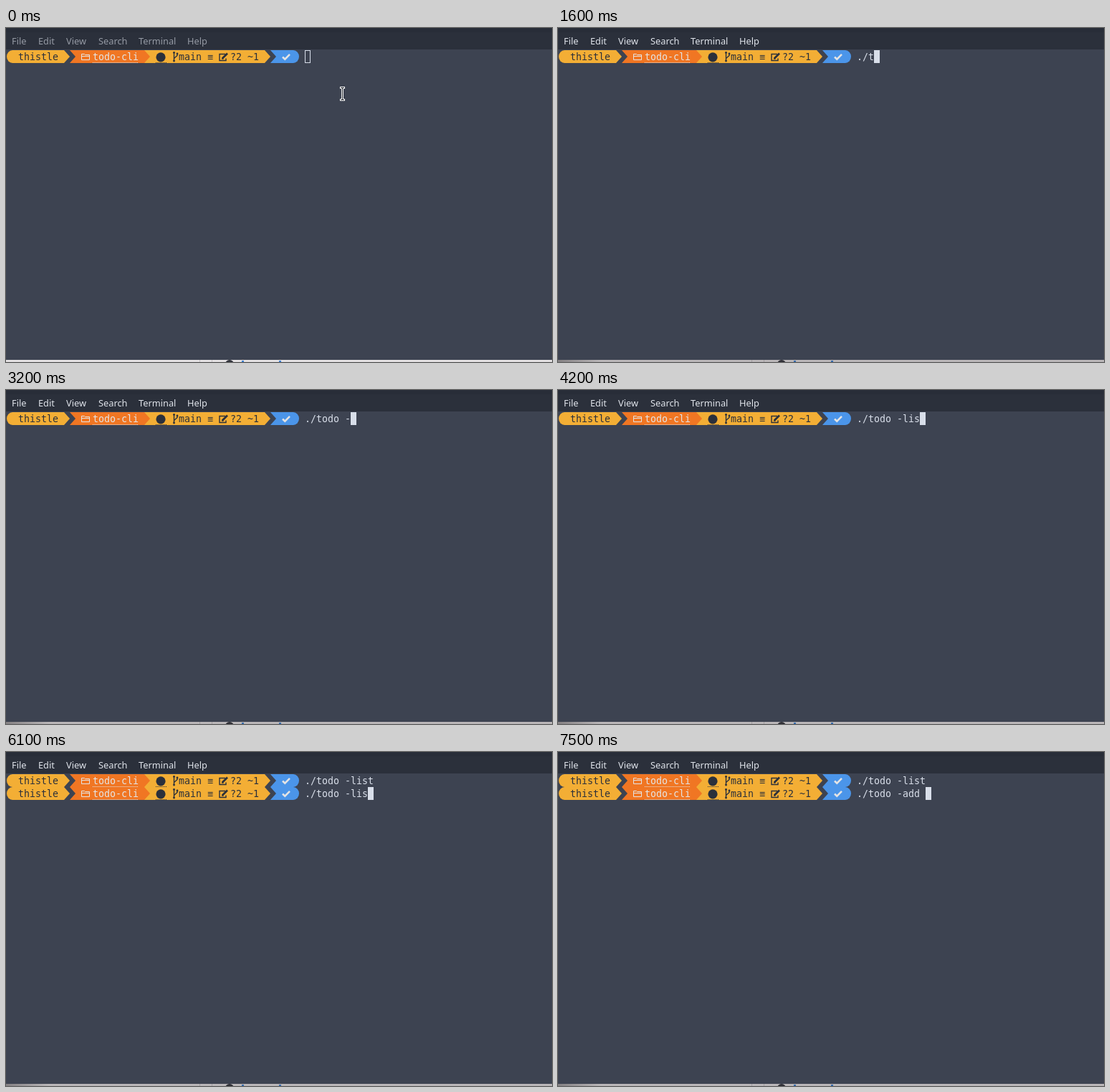
An HTML page with a canvas for the animation above (8 s loop, 762 by 467 pixels).

```html
<!DOCTYPE html>
<html lang="en">
<head>
<meta charset="utf-8">
<title>Terminal</title>
<style>
  html, body { margin: 0; width: 100%; height: 100%; overflow: hidden; background: #3d4351; }
  canvas { display: block; width: 762px; height: 467px; }
</style>
</head>
<body>
<canvas id="stage" width="762" height="467"></canvas>
<script>
const ctx = document.getElementById('stage').getContext('2d');
const W = 762, H = 467, LOOP = 8000;
const CELL = 8, ROW = 18, TOP = 31, INPUT_X = 417;
const MONO = '13.29px "DejaVu Sans Mono", "Noto Sans Mono", monospace';
const SANS = '12.8px "Noto Sans", "Open Sans", sans-serif';
const BG = '#3d4351', INK = '#2b303b', TEXT = '#d8dee9', PALE = '#e4e4e4';
const YELLOW = '#f3ae35', ORANGE = '#f07623', BLUE = '#4b95e9';

const FOCUS = 300, MENU_LIT = 500, MOUSE_MOVE = 100, MOUSE_HIDE = 1100, ENTER = 4800;
const MENU = [['File', 8], ['Edit', 45], ['View', 84], ['Search', 129], ['Terminal', 185], ['Help', 253]];

// [time, text on the input line]
const FIRST = [[0, ''], [1100, '.'], [1300, './'], [1600, './t'], [1700, './to'], [1900, './todo'],
  [2500, './todo '], [3200, './todo -'], [3700, './todo -l'], [3900, './todo -li'],
  [4200, './todo -lis'], [4300, './todo -list']];
const SECOND = [[4800, ''], [5800, './todo -list'], [6100, './todo -lis'], [6300, './todo -li'],
  [6400, './todo -l'], [6800, './todo -'], [7000, './todo -a'], [7200, './todo -ad'],
  [7400, './todo -add'], [7500, './todo -add ']];
const BLINK_OFF = [[1000, 1100], [5400, 5800]];

const typed = (keys, t) => keys.reduce((text, [at, s]) => t >= at ? s : text, '');

function rect(x, y, w, h, color) {
  ctx.fillStyle = color;
  ctx.fillRect(x, y, w, h);
}

function write(text, x, y, color, font = MONO) {
  ctx.font = font;
  ctx.fillStyle = color;
  ctx.fillText(text, x, y);
}

function trace(points, close) {
  ctx.beginPath();
  points.forEach(([x, y]) => ctx.lineTo(x, y));
  if (close) ctx.closePath();
}

function fillPoly(points, color) {
  trace(points, true);
  ctx.fillStyle = color;
  ctx.fill();
}

function line(points, color, width = 1, close = false) {
  trace(points, close);
  ctx.strokeStyle = color;
  ctx.lineWidth = width;
  ctx.stroke();
}

function dot(x, y, r, color) {
  ctx.beginPath();
  ctx.arc(x, y, r, 0, Math.PI * 2);
  ctx.fillStyle = color;
  ctx.fill();
}

function dotted(x, end, y, color) {
  for (; x < end; x += 2) rect(x, y, 1, 1, color);
}

// Segment with a pointed right end and an optional notch on the left
function arrow(x, end, notch, color) {
  const points = [[x, 0], [end, 0], [end + CELL, ROW / 2], [end, ROW], [x, ROW]];
  if (notch) points.push([x + CELL, ROW / 2]);
  fillPoly(points, color);
}

function cap(x, side, color) {
  ctx.beginPath();
  ctx.ellipse(x, ROW / 2, CELL, ROW / 2, 0, -Math.PI / 2, Math.PI / 2, side < 0);
  ctx.fillStyle = color;
  ctx.fill();
}

function folder(x, y) {
  line([[x, y], [x + 4, y], [x + 5, y + 1], [x + 11, y + 1], [x + 11, y + 8], [x, y + 8]], PALE, 1, true);
  line([[x, y + 3], [x + 11, y + 3]], PALE);
}

function branch(x, y) {
  line([[x + 1.5, y], [x + 1.5, y + 13]], INK, 1.4);
  line([[x + 6, y + 2], [x + 6, y + 5], [x + 1.5, y + 9]], INK, 1.4);
  dot(x + 1.5, y + 1, 1.4, INK);
  dot(x + 6, y + 2.5, 1.4, INK);
  dot(x + 1.5, y + 12.5, 1.4, INK);
}

function pencil(x, y) {
  line([[x + 9, y + 1], [x + 1, y + 1], [x + 1, y + 10], [x + 10, y + 10], [x + 10, y + 7]], INK, 1.4);
  line([[x + 5, y + 7], [x + 12, y]], INK, 2.6);
  fillPoly([[x + 4, y + 8.3], [x + 4.4, y + 5.4], [x + 7, y + 8]], INK);
}

function prompt(row) {
  ctx.save();
  ctx.translate(0, TOP + row * ROW);
  cap(9, -1, YELLOW);
  arrow(9, 81, false, YELLOW);
  arrow(193, 361, false, YELLOW);
  arrow(89, 193, true, ORANGE);
  fillPoly([[369, 0], [401, 0], [401, ROW], [369, ROW], [377, ROW / 2]], BLUE);
  cap(401, 1, BLUE);

  write('thistle', 17, 14, INK);
  folder(105.5, 5.5);
  write('todo-cli', 121, 14, PALE);
  dotted(121, 185, 17, PALE);
  dot(216, 9.8, 6.6, INK);
  dotted(209, 224, 17, INK);
  branch(233, 2.5);
  write('main ≡', 241, 14, INK);
  pencil(297, 4.5);
  write('?2 ~1', 313, 14, INK);
  line([[386, 9.5], [389.3, 12.7], [396, 5.8]], PALE, 2.6);
  ctx.restore();
}

function cursor(x, y, focused) {
  if (focused) return rect(x, y, CELL, ROW, TEXT);
  ctx.strokeStyle = TEXT;
  ctx.lineWidth = 1;
  ctx.strokeRect(x + 0.5, y + 0.5, CELL - 1, ROW - 1);
}

function ibeam(x, y) {
  rect(x, y, 7, 3, '#fff');
  rect(x, y + 17, 7, 3, '#fff');
  rect(x + 2, y, 3, 20, '#fff');
  rect(x + 1, y + 1, 5, 1, '#20242c');
  rect(x + 1, y + 18, 5, 1, '#20242c');
  rect(x + 3, y + 1, 1, 18, '#20242c');
}

// Sliver of the page behind the window
function backdrop(focused) {
  rect(0, 464, W, 3, '#e2dfe1');
  rect(270, 464, 1, 3, '#c2bfc2');
  rect(287, 464, 1, 3, '#c2bfc2');
  dot(312, 470, 6, '#30323a');
  for (const x of [329, 381]) rect(x, 465, 3, 2, '#3b7fd0');
  if (!focused) return;
  const shade = ctx.createLinearGradient(0, 0, 60, 0);
  shade.addColorStop(0, 'rgba(40,36,38,.5)');
  shade.addColorStop(1, 'rgba(40,36,38,.22)');
  rect(0, 464, W, 3, shade);
}

function draw(t) {
  const focused = t >= FOCUS, row = t >= ENTER ? 1 : 0;
  const line1 = typed(FIRST, t), line2 = typed(SECOND, t);
  rect(0, 0, W, H, BG);
  rect(0, 0, W, 30, '#2b303b');
  rect(0, 0, W, 6, '#282d38');
  for (const [label, x] of MENU) write(label, x, 22.5, t >= MENU_LIT ? '#dfe3ea' : '#959aa4', SANS);
  backdrop(focused);

  for (let r = 0; r <= row; r++) {
    prompt(r);
    write(r ? line2 : line1, INPUT_X, TOP + r * ROW + 14, TEXT);
  }
  if (!BLINK_OFF.some(([from, to]) => t >= from && t < to)) {
    const text = row ? line2 : line1;
    cursor(INPUT_X + text.length * CELL, TOP + row * ROW, focused);
  }
  if (t < MOUSE_MOVE) ibeam(466, 82);
  else if (t < MOUSE_HIDE) ibeam(468, 66);
}

const start = performance.now();
function tick() {
  draw((performance.now() - start) % LOOP);
  requestAnimationFrame(tick);
}
tick();
</script>
</body>
</html>
```
